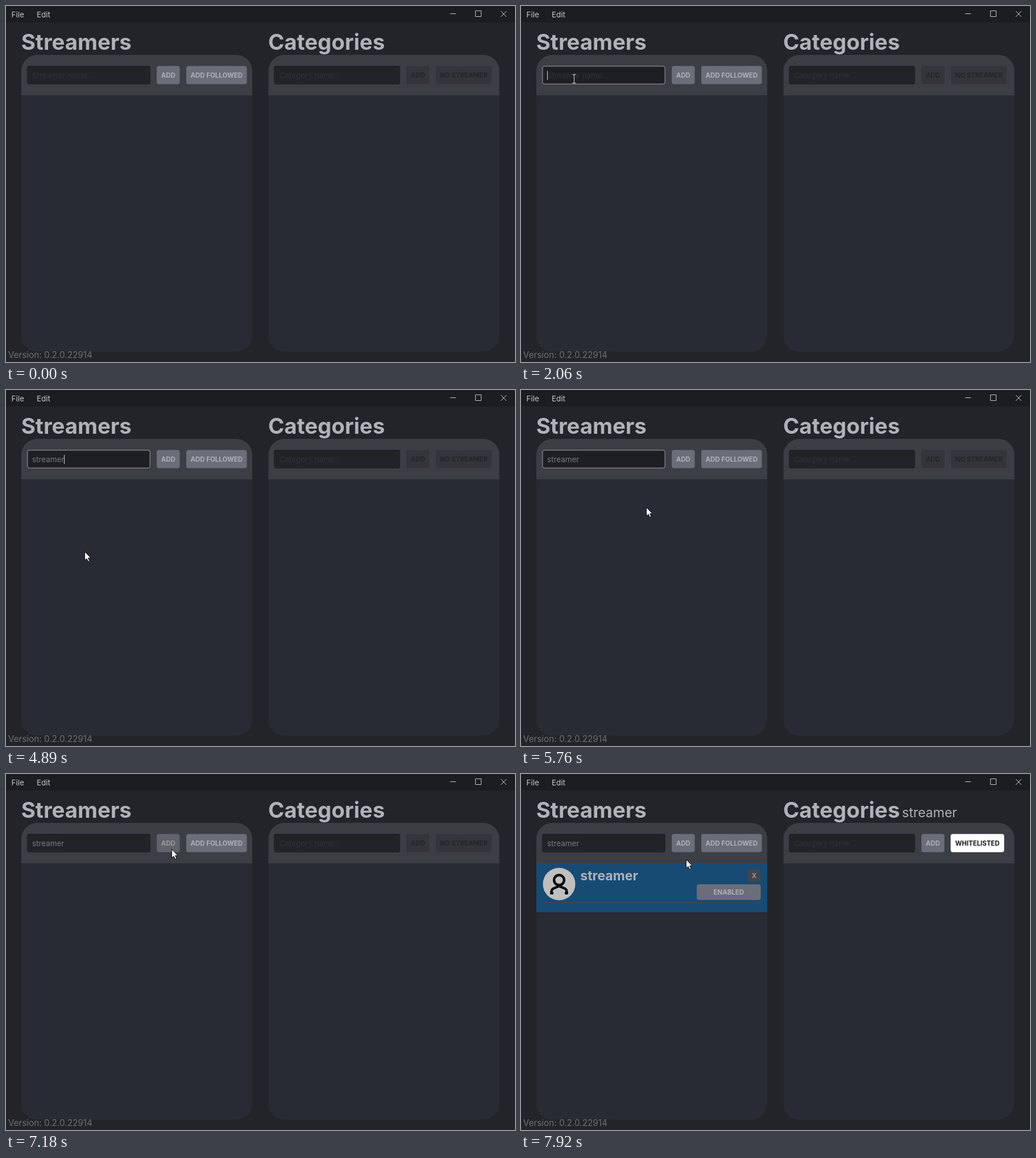
Animation of 895x626 px, one loop 7.99 s. Source, as an HTML page:

```html
<!DOCTYPE html>
<html lang="en">
<head>
<meta charset="utf-8">
<title>Streamers and categories</title>
<style>
  html, body { margin: 0; width: 100%; height: 100%; overflow: hidden; background: #232429; }
  svg { display: block; width: 100vw; height: 100vh; }
  text { font-family: Inter, "Open Sans", sans-serif; font-optical-sizing: none; white-space: pre; }
  .title { font-size: 38.3px; font-weight: 700; fill: #b0b2bb; }
  .menu { font-size: 13.4px; fill: #c6c7cc; }
  .field { font-size: 13.4px; fill: #77787d; }
  .hint { font-size: 13.4px; fill: #303237; }
  .label { font-size: 11.45px; font-weight: 700; text-anchor: middle; }
  .icon { fill: none; stroke: #c8c9ce; stroke-width: 1; }
</style>
</head>
<body>
<svg viewBox="0 0 895 626">
  <defs>
    <g id="panel">
      <rect width="406" height="522" rx="28" fill="#282b33"/>
      <path d="M0 71V28A28 28 0 0 1 28 0H378A28 28 0 0 1 406 28V71Z" fill="#3c3e45"/>
    </g>
  </defs>

  <rect width="895" height="626" fill="#232429"/>
  <rect width="895" height="29" fill="#1c1d21"/>
  <text class="menu" x="9.5" y="19.8">File</text>
  <text class="menu" x="54" y="19.8">Edit</text>
  <path class="icon" d="M781 13.5H791M825.5 8.5H835.5V18.5H825.5ZM870 9L880 19M880 9L870 19"/>

  <text class="title" x="26.8" y="76.8">Streamers</text>
  <text class="title" x="461" y="76.8">Categories</text>
  <use href="#panel" x="27" y="86"/>
  <use href="#panel" x="461.5" y="86"/>
  <text x="3.8" y="618.5" font-size="15.3" fill="#6e6f75">Version: 0.2.0.22914</text>

  <rect id="box" rx="4"/>
  <text id="hint" class="hint" x="46" y="127.3">Streamer name...</text>
  <text id="typed" class="field" x="46" y="127.3"></text>
  <rect id="caret" y="114" width="1" height="16" fill="#cfd0d4"/>
  <rect x="471" y="105" width="222" height="33" rx="4" fill="#222327"/>
  <text class="hint" x="480.5" y="127.3">Category name...</text>
  <g id="buttons"></g>

  <g id="item">
    <text x="670" y="76" font-size="23" fill="#b0b2bb">streamer</text>
    <rect x="27" y="157" width="406" height="86" fill="#184b74"/>
    <circle cx="67" cy="193.5" r="28.5" fill="#bfbfbf"/>
    <g fill="none" stroke="#060606" stroke-width="4.4">
      <circle cx="67" cy="186.5" r="8.8"/>
      <path d="M53.5 211V207.5Q53.5 202 59 200.5L67 197L75 200.5Q80.5 202 80.5 207.5V211" stroke-linejoin="round"/>
      <path d="M51.5 209.5H57M77 209.5H82.5"/>
    </g>
    <text x="104.3" y="187" font-size="23" font-weight="700" fill="#b0b2bb">streamer</text>
    <rect x="38" y="225.5" width="383" height="1.3" fill="#414653"/>
  </g>

  <path id="arrow" d="M.5 .5V15.6L4 12.4L6.4 17.6L8.9 16.5L6.5 11.4H11Z" fill="#fff" stroke="#000" stroke-width=".9"/>
  <path id="beam" d="M-3 -7.5H3M0 -7.5V7.5M-3 7.5H3" fill="none" stroke="#d8d8d8"/>
</svg>

<script>
const LOOP = 7990, FOCUS = 2060, PRESS = 6640, ADDED = 7790;
const WORD = "streamer";
const KEYS = [3550, 3820, 4020, 4220, 4350, 4550, 4750, 4890];

// time, x, y of the pointer
const TRACK = [
  [1180, 254, 576], [1510, 92, 213], [1930, 93, 128],
  [2650, 93, 128], [3150, 138, 284],
  [5483, 138, 284], [6170, 292, 138], [6310, 291, 133], [6380, 291, 132],
  [7725, 291, 132], [7920, 290, 150]
];
const STEP = 65;

const NORMAL = ["#6b6d78", "#b0b1ba"], OFF = ["#34353a", "#242529"];
const $ = id => document.getElementById(id);
const attr = (el, set) => { for (const k in set) el.setAttribute(k, set[k]); };
const show = (el, on) => attr(el, { visibility: on ? "visible" : "hidden" });

function make(tag, parent, set) {
  const el = document.createElementNS("http://www.w3.org/2000/svg", tag);
  attr(el, set);
  return parent.appendChild(el);
}

function button(parent, label, x, y, w, h, [fill, ink]) {
  const rect = make("rect", parent, { x, y, width: w, height: h, rx: 4, fill });
  const text = make("text", parent, { class: "label", x: x + w / 2, y: y + h / 2 + 4.3, fill: ink });
  text.textContent = label;
  return { rect, text };
}

const group = $("buttons"), item = $("item");
const add = button(group, "ADD", 265, 105.5, 40.5, 32, NORMAL);
button(group, "ADD FOLLOWED", 317, 105.5, 106.5, 32, NORMAL);
const idle = make("g", group, {}), ready = make("g", group, {});
button(idle, "ADD", 704, 105.5, 40.5, 32, OFF);
button(idle, "NO STREAMER", 756, 105.5, 98, 32, OFF);
button(ready, "ADD", 704, 105.5, 40.5, 32, NORMAL);
button(ready, "WHITELISTED", 755.5, 105.5, 94, 32, ["#ffffff", "#18191d"]);
button(item, "X", 399, 168, 22, 21, ["#43454c", "#96979e"]);
button(item, "ENABLED", 309, 194, 112.5, 27.5, NORMAL);

function pointer(t) {
  let i = TRACK.length - 1;
  while (i > 0 && TRACK[i][0] > t) i--;
  const a = TRACK[i], b = TRACK[i + 1];
  if (!b) return [a[1], a[2]];
  const u = Math.floor((t - a[0]) / STEP) * STEP / (b[0] - a[0]);
  const e = 1 - Math.pow(1 - u, 1.6);
  return [a[1] + (b[1] - a[1]) * e, a[2] + (b[2] - a[2]) * e];
}

function drawField(t) {
  const focus = t >= FOCUS && t < PRESS;
  const edge = focus ? 0.75 : 0;
  attr($("box"), {
    x: 37 + edge, y: 105 + edge, width: 217 - 2 * edge, height: 33 - 2 * edge,
    fill: focus ? "#1e1f23" : "#222327",
    stroke: focus ? "#7b7d87" : "none", "stroke-width": 1.5
  });
  const count = KEYS.filter(k => k <= t).length;
  const typed = $("typed");
  typed.textContent = WORD.slice(0, count);
  show($("hint"), !count);

  const since = t - (count ? KEYS[count - 1] : FOCUS);
  const lit = Math.floor((since + 54) / 514) % 2 === 0;
  show($("caret"), focus && lit);
  attr($("caret"), { x: 46 + (count ? Math.round(typed.getComputedTextLength()) : 0) });
}

function drawButtons(t) {
  const added = t >= ADDED;
  const fill = added || t < PRESS ? NORMAL[0] : t < 6710 ? "#666873" : "#60626d";
  const ink = added || t < 7110 ? NORMAL[1] : t < 7180 ? "#a5a6ab" : "#9a9a9c";
  attr(add.rect, { fill });
  attr(add.text, { fill: ink });
  show(idle, !added);
  show(ready, added);
  show(item, added);
}

function drawPointer(t) {
  const [x, y] = pointer(t).map(Math.round);
  const seen = t >= TRACK[0][0];
  const inField = x > 37 && x < 254 && y > 105 && y < 138;
  show($("arrow"), seen && !inField);
  show($("beam"), seen && inField);
  attr($("arrow"), { transform: `translate(${x} ${y})` });
  attr($("beam"), { transform: `translate(${x + 0.5} ${y})` });
}

function draw(t) {
  drawField(t);
  drawButtons(t);
  drawPointer(t);
}

const start = performance.now();
function tick() {
  draw((performance.now() - start) % LOOP);
  requestAnimationFrame(tick);
}
tick();
</script>
</body>
</html>
```
